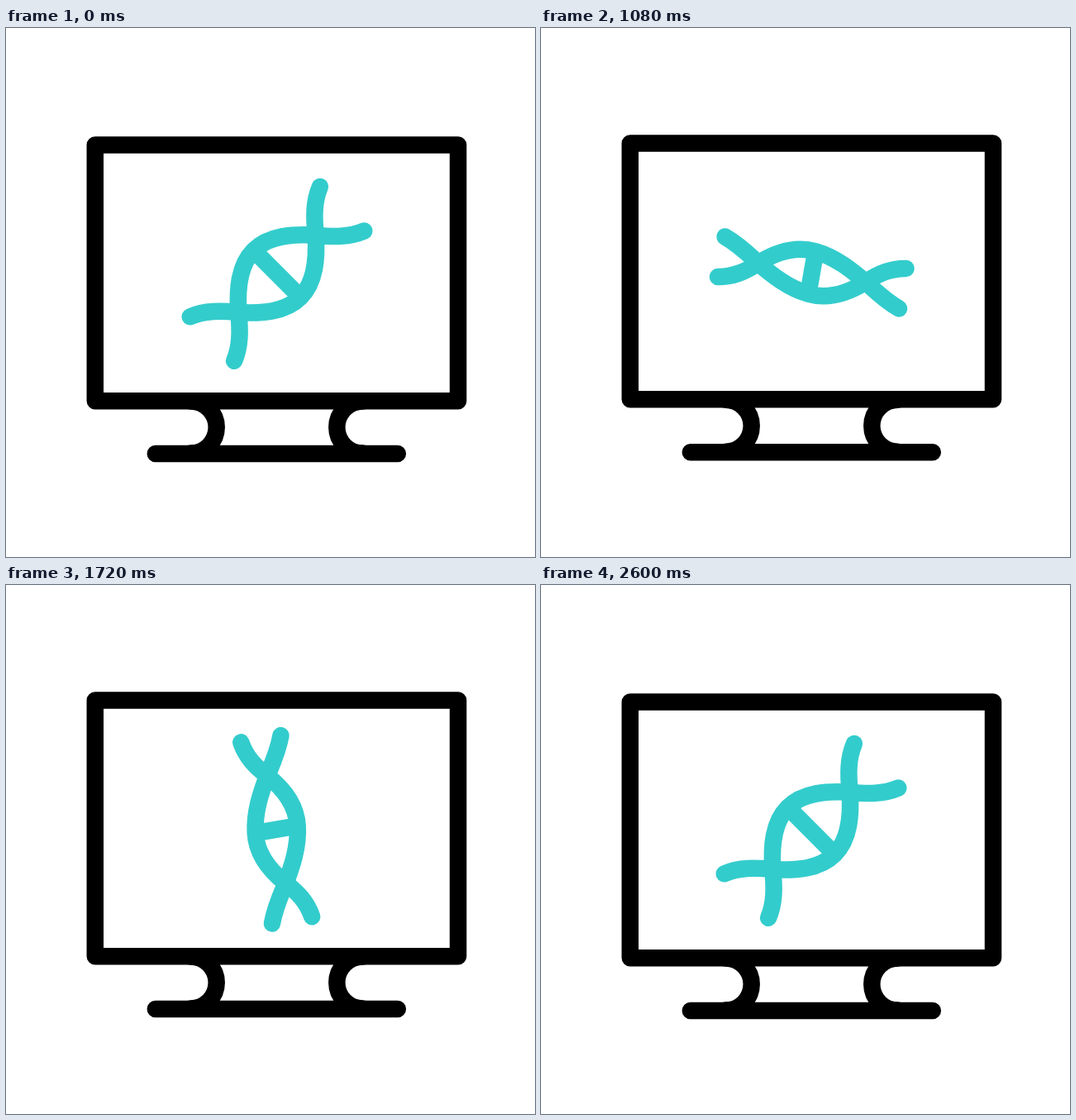
An HTML page with a canvas that plays this animation: 640x640 px, repeating every 2820 ms.

```html
<!DOCTYPE html>
<html>
<head>
<meta charset="utf-8">
<title>DNA on a monitor</title>
<style>
  html, body { margin: 0; width: 100%; height: 100%; overflow: hidden; background: #fff; }
  canvas { display: block; }
</style>
</head>
<body>
<canvas id="stage" width="640" height="640"></canvas>
<script>
const ctx = document.getElementById('stage').getContext('2d');
const LOOP = 2820, START = 200, SPAN = 2400;
const LIFT = [0, -19.3, 19.3, -19.3, 0];
const FLIP = [1, -1, 1];

const smooth = x => x * x * (3 - 2 * x);

// Eased value at progress p (0..1) through evenly spaced keys
function keyed(keys, p) {
  const pos = p * (keys.length - 1);
  const i = Math.min(Math.floor(pos), keys.length - 2);
  return keys[i] + (keys[i + 1] - keys[i]) * smooth(pos - i);
}

function stroke(color, cap, trace) {
  ctx.strokeStyle = color;
  ctx.lineCap = cap;
  ctx.beginPath();
  trace();
  ctx.stroke();
}

function drawMonitor() {
  stroke('#000', 'round', () => {
    ctx.rect(107.8, 141.4, 439.2, 309.8);
    ctx.moveTo(180.8, 515);
    ctx.lineTo(473.8, 515);
  });
  stroke('#000', 'round', () => ctx.arc(223.2, 483.1, 31.5, -Math.PI / 2, Math.PI / 2));
  stroke('#000', 'round', () => ctx.arc(431.8, 483.1, 31.5, Math.PI / 2, -Math.PI / 2));
}

// Strand along the x axis: v is scaled by flip, sway bends both strands into an S
function drawStrand(flip) {
  const sway = 1 - flip * flip;
  const point = (u, v, bend) => [u, v * flip + bend * sway];
  const half = side => {
    const at = (u, v, bend) => point(side * u, v, side * bend);
    ctx.moveTo(...at(0, -40, 0));
    ctx.bezierCurveTo(...at(26, -40, 5), ...at(48, -20.5, 5), ...at(66, 0, 0));
    ctx.bezierCurveTo(...at(80, 17, -3.5), ...at(93, 30.5, -3), ...at(111.2, 37.8, 0));
  };
  stroke('#3cc', 'round', () => { half(1); half(-1); });
}

function draw(time) {
  const p = Math.min(Math.max((time % LOOP - START) / SPAN, 0), 1);
  const flip = keyed(FLIP, p);
  ctx.clearRect(0, 0, 640, 640);
  ctx.save();
  ctx.lineWidth = 20.5;
  ctx.lineJoin = 'round';
  ctx.translate(0, keyed(LIFT, p));
  drawMonitor();
  ctx.translate(327.5, 297.4);
  ctx.rotate((smooth(p) - 0.25) * Math.PI);
  ctx.translate(0.35, 0.35);
  drawStrand(flip);
  drawStrand(-flip);
  stroke('#3cc', 'butt', () => {
    ctx.moveTo(0, -40 * flip);
    ctx.lineTo(0, 40 * flip);
  });
  ctx.restore();
}

const begin = performance.now();
function tick() {
  draw(performance.now() - begin);
  requestAnimationFrame(tick);
}
tick();
</script>
</body>
</html>
```
